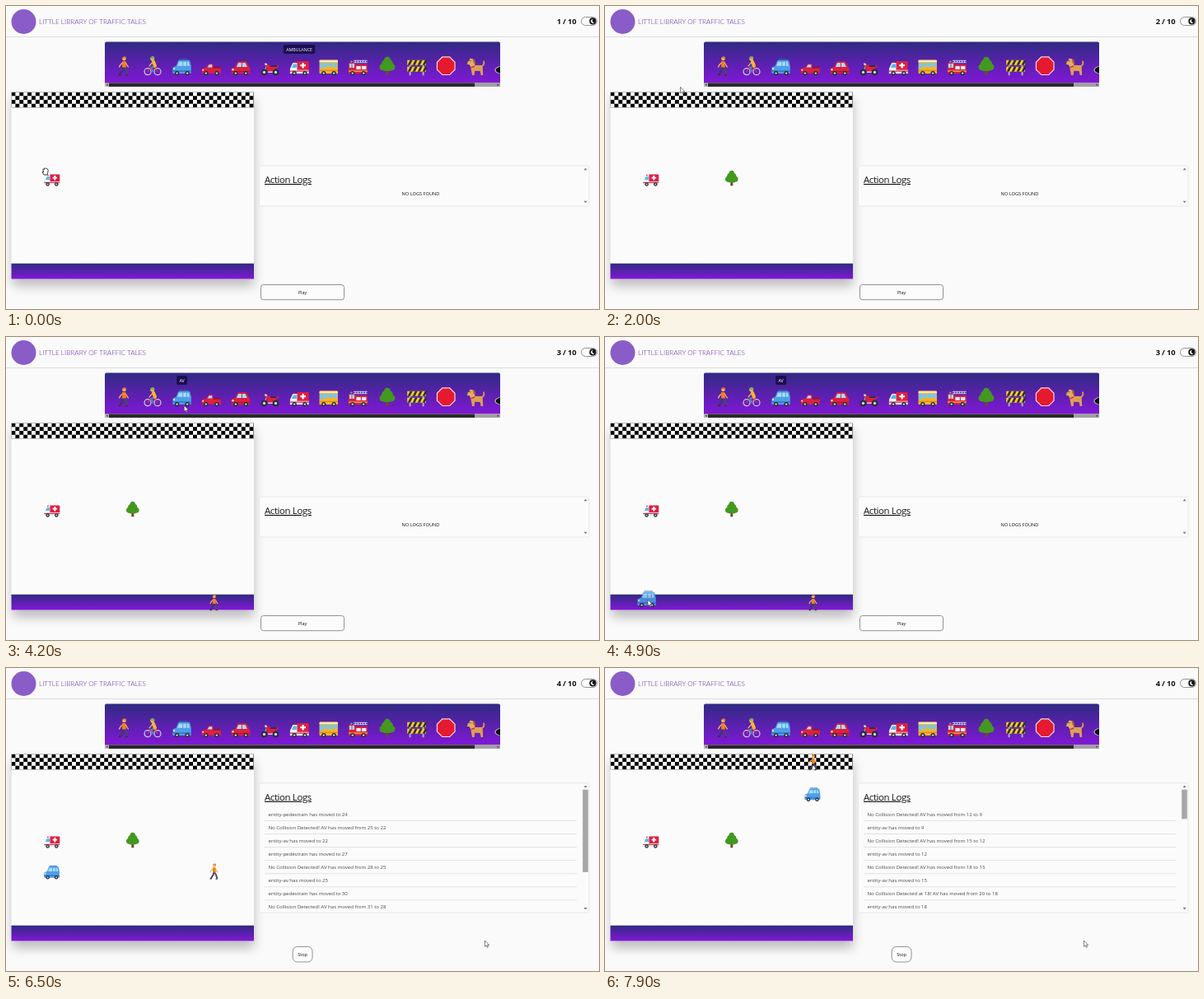
Recreate the animation shown at these times as an HTML page. Size 720 by 368 pixels, loop 8000 ms.

```html
<!DOCTYPE html>
<html lang="en">
<head>
<meta charset="utf-8">
<title>Driving board</title>
<style>
  html, body { margin: 0; width: 100%; height: 100%; overflow: hidden; background: #fafafa; }
  svg { display: block; width: 720px; height: 368px; }
  text { font-family: "Open Sans", "Noto Sans", sans-serif; fill: #111; white-space: pre; }
  .brand { font: 300 8.2px Lato, "Open Sans", sans-serif; fill: #5b2a9d; }
  .count { font-size: 9.4px; font-weight: 700; text-anchor: end; letter-spacing: -.2px; }
  .head { font-size: 11.4px; letter-spacing: -.36px; text-decoration: underline; }
  .none { font-size: 5.65px; text-anchor: middle; }
  .row { font-size: 6.05px; fill: #484848; }
  .tip { font-size: 5.3px; fill: #fff; text-anchor: middle; }
  .btn { font-size: 5.5px; font-weight: 500; text-anchor: middle; }
</style>
</head>
<body>
<svg viewBox="0 0 720 368" id="stage">
  <defs>
    <linearGradient id="violet" x1="0" y1="0" x2="0" y2="1">
      <stop offset="0" stop-color="#302a82"/><stop offset="1" stop-color="#8118d6"/>
    </linearGradient>
    <pattern id="checker" x="6.5" y="104.5" width="9.8" height="9.5" patternUnits="userSpaceOnUse">
      <path d="M0 0h4.9v4.75h-4.9zM4.9 4.75h4.9v4.75h-4.9z"/>
    </pattern>
    <filter id="soft" x="-20%" y="-20%" width="140%" height="140%"><feGaussianBlur stdDeviation="7"/></filter>
    <clipPath id="trayClip"><rect x="120" y="43" width="480" height="56"/></clipPath>
    <clipPath id="logClip"><rect id="logClipBox" x="308" width="400"/></clipPath>
  </defs>

  <rect width="720" height="368" fill="#fafafa"/>
  <path d="M0 37.5h720" stroke="#dcdcdc"/>
  <circle cx="21.5" cy="19" r="15" fill="#8a5cc8"/>
  <text class="brand" x="40" y="22">LITTLE LIBRARY OF TRAFFIC TALES</text>
  <text class="count" id="count" x="692.3" y="22.3"></text>
  <rect x="698.5" y="13.5" width="19" height="10" rx="5" fill="#fff" stroke="#777" stroke-width=".8"/>
  <circle cx="712.4" cy="18.4" r="4.1" fill="#111"/>
  <path d="M713 16a2.5 2.5 0 1 0 1.8 3.6a2 2 0 0 1-1.8-3.6z" fill="#fff"/>

  <path d="M120 93.5v-48q0-2 2-2h476q2 0 2 2v48z" fill="url(#violet)"/>
  <rect x="120" y="93.5" width="480" height="4.5" fill="#a0a0a0"/>
  <rect x="120" y="93.5" width="449" height="4.5" fill="#292929"/>
  <rect x="120" y="93.5" width="5" height="4.5" fill="#b5b5b5"/>
  <path d="M123.6 94.4v2.6l-2-1.3zM596.6 94.4v2.6l2-1.3z" fill="#333"/>
  <g id="tray" clip-path="url(#trayClip)"></g>
  <g id="tip"><rect y="47" height="11" rx="1.5" fill="#1c0d52"/><text class="tip" y="54.5"></text></g>

  <rect x="8" y="113" width="293" height="227" fill="#000" opacity=".25" filter="url(#soft)"/>
  <rect x="6.5" y="104.5" width="294.5" height="227" fill="#fbfbfb"/>
  <rect x="6.5" y="104.5" width="294.5" height="19" fill="#fff"/>
  <rect x="6.5" y="104.5" width="294.5" height="19" fill="url(#checker)"/>
  <rect x="6.5" y="312.7" width="294.5" height="18.8" fill="url(#violet)"/>
  <g id="board"></g>

  <rect id="panel" x="307.5" width="400.5" rx="2.5" fill="#fbfbfb" stroke="#e4e4e4" stroke-width=".8"/>
  <g clip-path="url(#logClip)">
    <text class="head" id="head" x="314">Action Logs</text>
    <text class="none" id="none" x="503.5" y="230.4">NO LOGS FOUND</text>
    <g id="rows"></g>
  </g>
  <rect id="thumb" x="700.2" width="6.6" fill="#a6a6a6"/>
  <path id="up" d="M701.6 1.2l2-2.4l2 2.4z" fill="#777"/>
  <path id="down" d="M701.6 -1.2l2 2.4l2 -2.4z" fill="#777"/>

  <rect id="btnBox"/>
  <text class="btn" id="btnText" x="360" y="350"></text>
  <g id="ghost" opacity=".85"></g>
  <g id="cursor"></g>
</svg>
<script>
const NS = "http://www.w3.org/2000/svg", LOOP = 8000;
const $ = id => document.getElementById(id);
const set = (el, o) => { for (const k in o) el.setAttribute(k, o[k]); };
const add = (parent, tag, o) => {
  const el = document.createElementNS(NS, tag);
  set(el, o);
  return parent.appendChild(el);
};

// Icons are drawn in a 24 x 24 box.
const p = (d, fill) => `<path d="${d}" fill="${fill}"/>`;
const line = (d, c, w = 1.6) =>
  `<path d="${d}" fill="none" stroke="${c}" stroke-width="${w}" stroke-linecap="round" stroke-linejoin="round"/>`;
const dot = (x, y, r, c) => `<circle cx="${x}" cy="${y}" r="${r}" fill="${c}"/>`;
const wheels = (a, b, r = 2.7) => [a, b].map(x =>
  dot(x, 23.6 - r, r, "#272d33") + dot(x, 23.6 - r, r * .45, "#ccd6dd")).join("");
const RED = "#dd2040", SKY = "#a9dcf7", SKIN = "#f2b45c", DARK = "#2b3038";

const icons = {
  PEDESTRAIN: line("M13 13l2.5 4l1.8 5.2", "#4a4668", 2.2) + line("M12.4 13l-1 4.6l-3 4.4", "#393c58", 2.2) +
    line("M16.8 23h-1.2M8.6 22.8h-1.4", DARK, 1.4) + line("M11.4 8l-2.8 2.6l-1.4 2.6M14.6 8l1.8 3l1.5 2.2", SKIN, 1.4) +
    p("M10.8 6.4h4l.6 7.4h-4.6z", "#f4801f") + dot(13, 3.3, 2.3, SKIN) + p("M11 2.4q1-2.4 3.6-1.7q2 1 .6 3.9l-1.6-2z", "#d98224"),
  CYCLIST: `<g fill="none" stroke="#c9ced8" stroke-width="1.2"><circle cx="6" cy="19" r="4"/><circle cx="18" cy="19" r="4"/></g>` +
    line("M6 19l3-5h6l3 5M9 14l3 5l3-5", "#e2433f", 1) + line("M14.5 12l-4 2.2l2 5", "#3b88c3", 2) +
    line("M13 7l2 5", "#ffb52e", 4) + line("M12 7.4l-4 4.8", SKIN, 1.3) + dot(11.6, 3.6, 2.4, SKIN) +
    p("M9 3.2q.4-3 3.2-2.8q2.5.4 2.2 3.2z", "#77b255"),
  AV: p("M1 13.5l4-1.5l2.4-6q.4-1 1.6-1h11q1.4 0 1.8 1.2l1.4 6v8.2q0 1-1 1H2q-1.4 0-1.4-1.4z", "#4d9fe8") +
    p("M6.4 12l2-5h4.2v5zM13.6 7h3.6v5h-3.6zM18.2 7h1.9l1.2 5h-3.1z", SKY) + p("M.6 17.5h22.6v1.6H.6z", "#3779c0") +
    dot(2.4, 15.4, 1.1, "#fff2b0") + line("M9 4.2h10", "#2f6fb0", 1) + wheels(6, 18.5),
  PICKUP: p("M.6 15.5l5.6-1.8l2.6-4.2h5.4v4.6h9.4v7H.6z", RED) + p("M7.4 13.7l2-3.1h3.6v3.1z", SKY) +
    p("M14.6 13h9v2h-9z", "#8d1630") + dot(2, 17, 1, "#ffe8a0") + wheels(5.6, 18.6),
  CAR: p("M.8 15l4.6-1.6l2.8-6q.4-.8 1.4-.8h8.6q1 0 1.5.9l2.6 5.5l1.2 1.6v6.8H.8z", RED) +
    p("M7 13.2l2.2-5h3.8v5zM14 8.2h3.6l2.4 5h-6z", SKY) + dot(2.6, 16.6, 1.2, "#ffe8a0") +
    p("M1 18.5h22v1H1z", "#a0142c") + wheels(6, 18.4),
  MOTORBIKE: line("M5.4 19l3-8.4l-2.4-1.4", "#9aa5ae", 1.2) + p("M7 12q4-3 8 .8l6.4-1.6l1.4 1.6l-4 2.6l-4 4.6H10z", RED) +
    line("M13 12.4h6.5", DARK, 1.8) + line("M10 19.5h8", "#ccd6dd", 1.6) + wheels(5, 19, 3.8) + dot(7, 10, 1.3, "#ffd983"),
  AMBULANCE: p("M.8 15.4l2.8-6.2q.4-.8 1.2-.8h5v13H.8z", "#f1f5f8") + p("M2.8 14.4l2-4.6h4v4.6z", "#55b8f0") +
    p("M9.4 6.4h13.4q.8 0 .8.8v10H9.4z", RED) + p("M.8 17h22.8v4.4H.8z", "#e4eaee") + p("M.8 17.8h22.8v1.2H.8z", RED) +
    p("M15.4 8.2h2.2v2.2h2.2v2.2h-2.2v2.2h-2.2v-2.2h-2.2v-2.2h2.2z", "#fff") + dot(6.4, 7.6, 1, RED) + wheels(6, 18.8),
  BUS: p("M.8 6q0-1.4 1.4-1.4h19.6q1.4 0 1.4 1.4v15.4H.8z", "#f7b32b") + p("M.8 5.4h22.4v2H.8z", "#f4ead2") +
    p("M1.4 8.4h3.8v7H1.4zM6.2 8.4h4.8v5H6.2zM12 8.4h4.8v5H12zM17.8 8.4h4.6v5h-4.6z", "#72c8f2") +
    p("M.8 17h22.4v1.2H.8z", "#d98a1b") + wheels(6, 18.4),
  "FIRE TRUCK": p("M.6 9q0-1.2 1.2-1.2h6.4v2.6h15.2v11H.6z", RED) + p("M1.6 9.4h2.6v5H1.6zM5 9.4h2.6v5H5z", SKY) +
    line("M7 5.6h16M7 8h16M9 5.6v2.4M12 5.6v2.4M15 5.6v2.4M18 5.6v2.4M21 5.6v2.4", "#d5dde3", .9) +
    p("M10 12.4h5.4v4H10zM16.6 12.4h5.4v4h-5.4z", "#e8edf0") + p("M.6 17.8h22.8v1.2H.6z", "#f5c04a") +
    dot(4, 6.9, 1.2, "#4aa8ea") + wheels(5.4, 18.8),
  TREE: p("M10.6 15h2.8l.5 8h-3.8z", "#70462f") + p("M12 .8q3.5.4 4 4q3 1.6 2.8 4.4q3 1.6 2.6 4.8q-.6 3.6-4 3.6q-2.6 1.4-5.4.4q-2.8 1-5.4-.4q-3.4 0-4-3.6q-.4-3.2 2.6-4.8q-.2-2.8 2.8-4.4q.5-3.6 4-4z", "#43981f"),
  BARRIER: p("M3 8h2v15.6H3zM19 8h2v15.6h-2z", "#a9b3ba") + p("M.6 5h22.8v6H.6zM.6 13h22.8v6H.6z", "#ffcc2e") +
    [5, 13].map(y => [1, 7, 13, 19].map(x => p(`M${x} ${y + 6}l3-6h3l-3 6z`, DARK)).join("")).join(""),
  STOP: p("M7.3.6h9.4l6.7 6.7v9.4l-6.7 6.7H7.3L.6 16.7V7.3z", "#f3d9dc") + p("M7.8 1.8h8.4l6 6v8.4l-6 6H7.8l-6-6V7.8z", "#e5192f"),
  DOG: line("M20.4 12q3-2 1.8-5.4", "#d99a4e", 1.8) + p("M6 11l14 .4q1.6 2 1 5l.4 7h-2.6l-1-5l-6.4-.4l-.6 5.4H8.2L7 17z", "#dda052") +
    p("M1.4 7.4l3-1.2l1-3.2l3.6.4l2.4 3.2v5.2q-2.6 3-5 1.6l-1.6-2.8l-3-.6z", "#e5ad63") +
    p("M8.6 3.4l2.8 1l1 5.4l-2.4-1z", "#a8672c") + dot(1.9, 8.2, .9, DARK) + dot(6, 6, .6, DARK) + p("M6.6 13.2l4.6-1.6v1.4l-4 1.6z", RED),
  HOLE: `<ellipse cx="12" cy="17" rx="12" ry="5.4" fill="#c9c6d6"/><ellipse cx="12" cy="17" rx="11" ry="4.7" fill="#101014"/>`
};
const trayX = i => 142.4 + i * 35.62, TRAY_Y = 72.7;
const place = (g, x, y, size) => set(g, { transform: `translate(${x - size / 2} ${y - size / 2}) scale(${size / 24})` });
const names = Object.keys(icons);
names.forEach((n, i) => {
  const g = add($("tray"), "g", {});
  g.innerHTML = icons[n];
  place(g, trayX(i), TRAY_Y, 24);
});

const cursors = {
  arrow: `<path d="M0 0v7.4l1.7-1.5l1.1 2.6l1.2-.5l-1.1-2.5h2.3z" fill="#fff" stroke="#333" stroke-width=".6"/>`,
  grab: `<path d="M-2 4l-2-3.4q.3-1 1.6.3l-.8-3.6q.8-1 1.4.4q0-2.4 1.3-1.6q.5-.9 1.3.5q1.1-.8 1.4.8q1.1-.4 1 1.2l-.6 3.2l-.7 2.2z" fill="#fff" stroke="#222" stroke-width=".9"/>`,
  point: `<path d="M-.7-3.6q.8-.9 1.4 0v3l2.6.6q.9.4.6 1.6l-.8 3.2H-.8L-2.8 1.6q.2-1 1.2-.4l.9.8z" fill="#fff" stroke="#111" stroke-width=".7"/>`
};
// time, x, y, shape
const path = [
  [0, 48, 201, "grab"], [200, 48, 201, "arrow"], [700, 462, 72, "grab"], [900, 462, 72, "arrow"],
  [1550, 153, 210, "grab"], [1650, 153, 210, "arrow"], [2000, 91.5, 98.5, "arrow"], [2400, 138, 73, "grab"],
  [2700, 138, 73, "arrow"], [3500, 266, 320, "arrow"], [3650, 254, 322, "grab"], [3800, 254, 322, "arrow"],
  [4250, 215, 75, "grab"], [4400, 215, 75, "arrow"], [4900, 52, 319, "arrow"], [5000, 55, 320, "grab"],
  [5150, 55, 320, "arrow"], [5700, 361, 349, "point"], [5900, 364, 350.5, "point"], [6000, 364, 350.5, "arrow"],
  [6500, 581.5, 331, "arrow"], [LOOP, 581.5, 331, "arrow"]
];
const drags = [
  { name: "TREE", from: 900, to: 1550 }, { name: "PEDESTRAIN", from: 2700, to: 3650 }, { name: "AV", from: 4400, to: 5000 }
];
const tips = [[0, 200, "AMBULANCE"], [680, 1550, "TREE"], [2350, 3650, "PEDESTRAIN"], [4200, 5000, "AV"]];

function cursorAt(t) {
  const i = path.findIndex((k, n) => n + 1 === path.length - 1 || t < path[n + 1][0]);
  const [a, b] = [path[i], path[i + 1]];
  const u = Math.min(1, (t - a[0]) / (b[0] - a[0])), e = u * u * (3 - 2 * u);
  return { x: a[1] + (b[1] - a[1]) * e, y: a[2] + (b[2] - a[2]) * e, shape: a[3] };
}

// Run of the simulation: moves of both entities and the log lines they leave.
const moves = { PEDESTRAIN: [[3650, 36]], AV: [[5000, 34]] }, logs = [];
const log = (t, s) => logs.push([t, s]);
const walk = (t, to) => {
  moves.PEDESTRAIN.push([t, to]);
  log(t, `entity-pedestrain has moved to ${to}`);
};
const drive = (t, to) => {
  const from = moves.AV[moves.AV.length - 1][1];
  moves.AV.push([t, to]);
  log(t, `entity-av has moved to ${to}`);
  log(t, `No Collision Detected${to === 18 ? " at 18" : ""}! AV has moved from ${from} to ${to}`);
};
[31, 28, 25, 22, 19, 20].forEach((to, i) => {
  drive(6080 + i * 120, to);
  walk(6120 + i * 120, 33 - i * 3);
});
[6770, 6840, 6910].forEach(t => {
  log(t, "Detected that the next row is blocked starting from 16 position");
  log(t, "At position 20, AV waited for the moving entity");
});
[15, 12, 9, 6, 3].forEach((to, i) => walk(6970 + i * 90, to));
[18, 15, 12, 9].forEach((to, i) => drive(7450 + i * 115, to));
moves.AMBULANCE = [[0, 16]];
moves.TREE = [[1550, 17]];

const pieces = ["AMBULANCE", "TREE", "PEDESTRAIN", "AV"].map(name => {
  const g = add($("board"), "g", {});
  g.innerHTML = icons[name];
  return { name, g };
});
const PITCH = 16.07;
const rows = Array.from({ length: 8 }, () => ({
  text: add($("rows"), "text", { class: "row", x: 318.5 }),
  rule: add($("rows"), "path", { stroke: "#d8d8d8", "stroke-width": .7 })
}));
const show = (el, on) => { el.style.display = on ? "" : "none"; };

function drawPieces(t) {
  let count = 0;
  for (const { name, g } of pieces) {
    const past = moves[name].filter(m => m[0] <= t);
    show(g, past.length);
    if (!past.length) continue;
    count++;
    const cell = past[past.length - 1][1] - 1;
    place(g, 55.6 + (cell % 3) * 98.2, 114.5 + Math.floor(cell / 3) * 18.92, 20);
  }
  $("count").textContent = `${count} / 10`;
}

function drawLogs(t) {
  const past = logs.filter(l => l[0] <= t).reverse(), n = past.length;
  const h = Math.min(157.5, 33 + PITCH * Math.max(1, n)), top = 218.5 - h / 2;
  set($("panel"), { y: top, height: h });
  set($("logClipBox"), { y: top, height: h });
  set($("head"), { y: top + 21 });
  show($("none"), !n);
  rows.forEach((r, i) => {
    show(r.text, i < n);
    show(r.rule, i < n);
    r.text.textContent = i < n ? past[i][1] : "";
    set(r.text, { y: top + 39.8 + i * PITCH });
    set(r.rule, { d: `M314 ${top + 45.7 + i * PITCH}H693` });
  });
  set($("up"), { transform: `translate(0 ${top + 4})` });
  set($("down"), { transform: `translate(0 ${top + h - 5})` });
  const full = 29 + PITCH * n;
  show($("thumb"), full > h);
  set($("thumb"), { y: top + 8, height: 141 * Math.min(1, h / full) });
}

function drawButton(t) {
  const running = t >= 6000, hover = !running && t >= 5650;
  const [x, y, w, h] = running ? [348.2, 338.5, 23.8, 18.5] : hover ? [311, 339, 98, 17.5] : [309.5, 338.5, 101, 18.2];
  set($("btnBox"), {
    x, y, width: w, height: h, rx: running ? 5.5 : 3, "stroke-width": .8,
    fill: hover ? "#111" : "#fcfcfc", stroke: hover ? "#111" : "#777"
  });
  $("btnText").textContent = running ? "Stop" : "Play";
  $("btnText").style.fill = hover ? "#fff" : "#111";
}

function drawPointer(t) {
  const c = cursorAt(t), drag = drags.find(d => t >= d.from && t < d.to);
  $("cursor").innerHTML = cursors[c.shape];
  set($("cursor"), { transform: `translate(${c.x} ${c.y})` });
  show($("ghost"), drag);
  if (drag) {
    const start = cursorAt(drag.from);
    $("ghost").innerHTML = icons[drag.name];
    place($("ghost"), trayX(names.indexOf(drag.name)) + c.x - start.x, TRAY_Y + c.y - start.y, 24);
  }
  const tip = tips.find(k => t >= k[0] && t < k[1]);
  show($("tip"), tip);
  if (tip) {
    const [box, label] = $("tip").children, x = trayX(names.indexOf(tip[2]));
    label.textContent = tip[2];
    set(label, { x });
    const w = label.getComputedTextLength() + 6.5;
    set(box, { x: x - w / 2, width: w });
  }
}

const begin = performance.now();
function frame() {
  const t = (performance.now() - begin) % LOOP;
  drawPieces(t);
  drawLogs(t);
  drawButton(t);
  drawPointer(t);
  requestAnimationFrame(frame);
}
frame();
</script>
</body>
</html>
```
